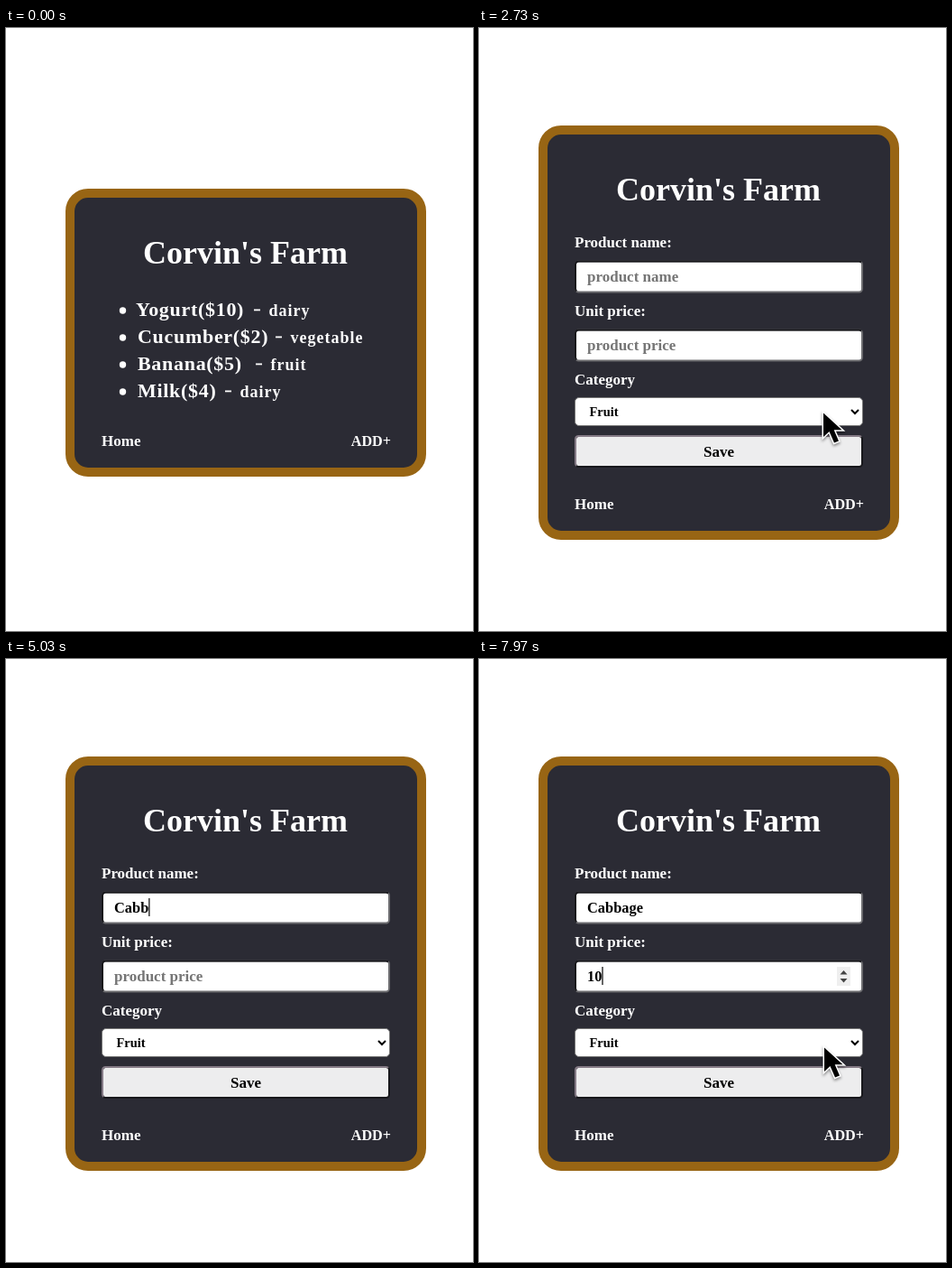
Animation, 518 px wide and 668 px high, one loop 8000 ms. Source, as an HTML page:

```html
<!DOCTYPE html>
<html lang="en">
<head>
<meta charset="utf-8">
<title>Farm products</title>
<style>
  html, body { margin: 0; width: 100%; height: 100%; overflow: hidden; background: #fff; }
  svg { display: block; width: 100%; height: 100%; }
  text { font: bold 17px "Liberation Serif", "Times New Roman", serif; fill: #fff; white-space: pre; }
  .title { font-size: 36px; text-anchor: middle; }
  .item { font-size: 22px; letter-spacing: .7px; }
  .kind { font-size: 18px; letter-spacing: 1px; }
  .end { font-size: 16.2px; text-anchor: end; }
  .mid { text-anchor: middle; }
  .dark { fill: #000; }
  .value { font-size: 16.4px; }
  .hint { fill: #757575; }
  .small { font-size: 14.4px; }
  .option { font: 500 13px Inter, "Open Sans", sans-serif; fill: #1f1f1f; }
  #pointer { filter: drop-shadow(0 2px 1.5px rgba(0, 0, 0, .4)); }
</style>
</head>
<body>
<svg id="stage" viewBox="0 0 518 668"></svg>
<script>
const LOOP = 8000;
const FORM_AT = 2330;
const stage = document.getElementById("stage");

const text = (x, y, str, cls = "", id = "") =>
  `<text x="${x}" y="${y}" class="${cls}" ${id && `id="${id}"`}>${str}</text>`;

const board = (y, h) =>
  `<rect x="71" y="${y + 5}" width="390" height="${h - 10}" rx="20" fill="#2b2b34" stroke="#986514" stroke-width="10"/>` +
  text(265.5, y + 83, "Corvin's Farm", "title") +
  text(106, y + h - 34, "Home") +
  text(427, y + h - 34, "ADD+", "end");

// Two-tone border: one colour for top and left, one for bottom and right
const bevel = (y, h, topLeft, bottomRight, fill) => {
  const top = y + 1, bottom = y + h - 1;
  return `<rect x="107" y="${top}" width="318" height="${h - 2}" rx="3.5" fill="${fill}" stroke="${bottomRight}" stroke-width="2"/>
    <path d="M108 ${bottom - 1}Q107 ${bottom - 2} 107 ${bottom - 4}V${top + 3.5}Q107 ${top} 110.5 ${top}H421.5Q423 ${top} 424 ${top + 1}"
      fill="none" stroke="${topLeft}" stroke-width="2"/>`;
};

const field = (y, hint, name) =>
  bevel(y, 36, "#17171b", "#6d6d70", "#fff") +
  text(120, y + 23.5, hint, "hint", name + "Hint") +
  text(120, y + 23.5, "", "dark value", name + "Value");

const products = [
  ["Yogurt($10)", "dairy", 144, 275],
  ["Cucumber($2)", "vegetable", 146, 299],
  ["Banana($5)", "fruit", 146, 277],
  ["Milk($4)", "dairy", 146, 243],
];

const listRow = ([name, kind, x, dash], i) => {
  const y = 319 + i * 30;
  return `<circle cx="129.5" cy="${y - 6}" r="3.7" fill="#fff"/>` +
    text(x, y, name, "item") +
    `<rect x="${dash}" y="${y - 7.5}" width="7" height="1.8" fill="#fff"/>` +
    text(dash + 16.5, y, kind, "kind");
};

const beam = "M-9-17.5C-3-17.5 0-15 0-10V11C0 15.500-3 18-9 18M9-17.5C3-17.5 0-15 0-10M0 11C0 15.500 3 18 9 18M-4 1H4";

stage.innerHTML = `
  <g id="list">${board(178, 319)}${products.map(listRow).join("")}</g>
  <g id="form">
    ${board(108, 459)}
    ${text(106, 243, "Product name:")}
    ${field(257.5, "product name", "name")}
    ${text(106, 319, "Unit price:")}
    ${field(333.5, "product price", "price")}
    <g id="spinner">
      <rect x="397" y="341" width="15" height="21" fill="#efefef"/>
      <path d="M400.500 349.500L404.500 345L408.500 349.500ZM400.500 354L404.500 358.500L408.500 354Z" fill="#444"/>
    </g>
    ${text(106, 395, "Category")}
    <rect x="106.5" y="409.5" width="319" height="31" rx="4.500" fill="#fff" stroke="#767676"/>
    ${text(122.5, 430, "Fruit", "dark small")}
    <path d="M413 423L417 427L421 423" fill="none" stroke="#000" stroke-width="2"/>
    ${bevel(451, 36, "#857b86", "#17171b", "#ededee")}
    ${text(266, 475, "Save", "dark mid")}
    <rect id="caret" width="1.2" height="20" fill="#000"/>
    <g id="menu"></g>
  </g>
  <g id="pointer">
    <path id="arrow" d="M1 2.500V29L7.500 23L13 35.500L18 33.400L12.700 21.300H21.500Z"
      fill="#000" stroke="#fff" stroke-width="3" paint-order="stroke"/>
    <g id="hand" stroke="#000" stroke-width="1.700" stroke-linejoin="round" stroke-linecap="round">
      <path fill="#fff" d="M-4 3C-4-1 1-2 2.500 2L6.500 13C6.500 9 11 8.500 12 12C13 9 17 9 17.500 13C19 11 21.500 12 21.500 15V22C21.500 27 19 28 18.500 33H4C3 27-3 24-8.500 19C-12 15-7 12-3.500 15L1 18Z"/>
      <path d="M8 19V27M12.300 19V27M16.500 19V27"/>
    </g>
    <g id="ibeam" fill="none" stroke-linecap="round">
      <path d="${beam}" stroke="#fff" stroke-width="4.600"/>
      <path d="${beam}" stroke="#000" stroke-width="2.200"/>
    </g>
  </g>`;

const el = {};
stage.querySelectorAll("[id]").forEach(node => el[node.id] = node);
const show = (node, on) => node.style.display = on ? "" : "none";

// Pointer path: time, x, y
const path = [
  [530, 486, 553], [1200, 428, 466], [1370, 428, 466], [1830, 411, 474],
  [2430, 411, 474], [2730, 381, 424], [3200, 172, 277], [6200, 172, 277],
  [6600, 188, 351], [7600, 188, 351], [7750, 494, 470], [7870, 430, 446], [7970, 382, 428],
];
const visible = [[530, 4050], [6200, 7250], [7600, LOOP]];

const nameKeys = [[4050, "C"], [4550, "Ca"], [4750, "Cab"], [4950, "Cabb"],
  [5450, "Cabba"], [5650, "Cabbag"], [5850, "Cabbage"]];
const priceKeys = [[7250, "1"], [7520, "10"]];
const options = ["corvin", "cabage", "cc", "Corvin", "Corvin Wick", "Corvin Tola"];
const NAME_CLICK = 3500, PRICE_CLICK = 6950;

const typed = (keys, t) => keys.reduce((last, key) => key[0] <= t ? key : last, [0, ""]);

function pointerAt(t) {
  if (t <= path[0][0]) return path[0].slice(1);
  const i = path.findIndex(p => p[0] > t);
  if (i < 0) return path[path.length - 1].slice(1);
  const [t0, x0, y0] = path[i - 1], [t1, x1, y1] = path[i];
  const u = (t - t0) / (t1 - t0), k = u * u * (3 - 2 * u);
  return [x0 + (x1 - x0) * k, y0 + (y1 - y0) * k];
}

const inside = (x, y, left, top, right, bottom) => x > left && x < right && y > top && y < bottom;

function drawMenu(value) {
  const hits = value ? options.filter(o => o.toLowerCase().startsWith(value.toLowerCase())) : [];
  el.menu.innerHTML = hits.length
    ? `<rect x="106" y="294" width="320" height="${hits.length * 36 + 16}" rx="4" fill="#fff"/>` +
      hits.map((o, i) => text(118, 325 + i * 36, o, "option")).join("")
    : "";
}

function setField(name, value) {
  el[name + "Value"].textContent = value;
  show(el[name + "Hint"], !value);
}

function drawCaret(t, name, y, since) {
  const width = el[name + "Value"].textContent ? el[name + "Value"].getComputedTextLength() : -1;
  el.caret.setAttribute("x", 120 + width);
  el.caret.setAttribute("y", y);
  show(el.caret, (t - since) % 1000 < 500);
}

function draw(t) {
  const onForm = t >= FORM_AT;
  const [x, y] = pointerAt(t);
  const [nameTime, name] = typed(nameKeys, t);
  const [priceTime, price] = typed(priceKeys, t);
  const overName = onForm && inside(x, y, 106, 257, 426, 293);
  const overPrice = onForm && inside(x, y, 106, 333, 426, 369);
  const overSpinner = overPrice && x > 397;
  const overAdd = !onForm && inside(x, y, 383, 440, 440, 480);

  show(el.list, !onForm);
  show(el.form, onForm);
  setField("name", name);
  setField("price", price);
  drawMenu(name);
  show(el.spinner, overPrice || t >= PRICE_CLICK);

  if (t >= PRICE_CLICK) drawCaret(t, "price", 341, Math.max(PRICE_CLICK, priceTime));
  else if (t >= NAME_CLICK) drawCaret(t, "name", 265, Math.max(NAME_CLICK, nameTime));
  else show(el.caret, false);

  const shape = overAdd ? "hand" : (overName || overPrice) && !overSpinner ? "ibeam" : "arrow";
  for (const id of ["arrow", "hand", "ibeam"]) show(el[id], id === shape);
  show(el.pointer, visible.some(([from, to]) => t >= from && t < to));
  el.pointer.setAttribute("transform", `translate(${x} ${y})`);
}

function tick() {
  draw(performance.now() % LOOP);
  requestAnimationFrame(tick);
}
tick();
</script>
</body>
</html>
```
